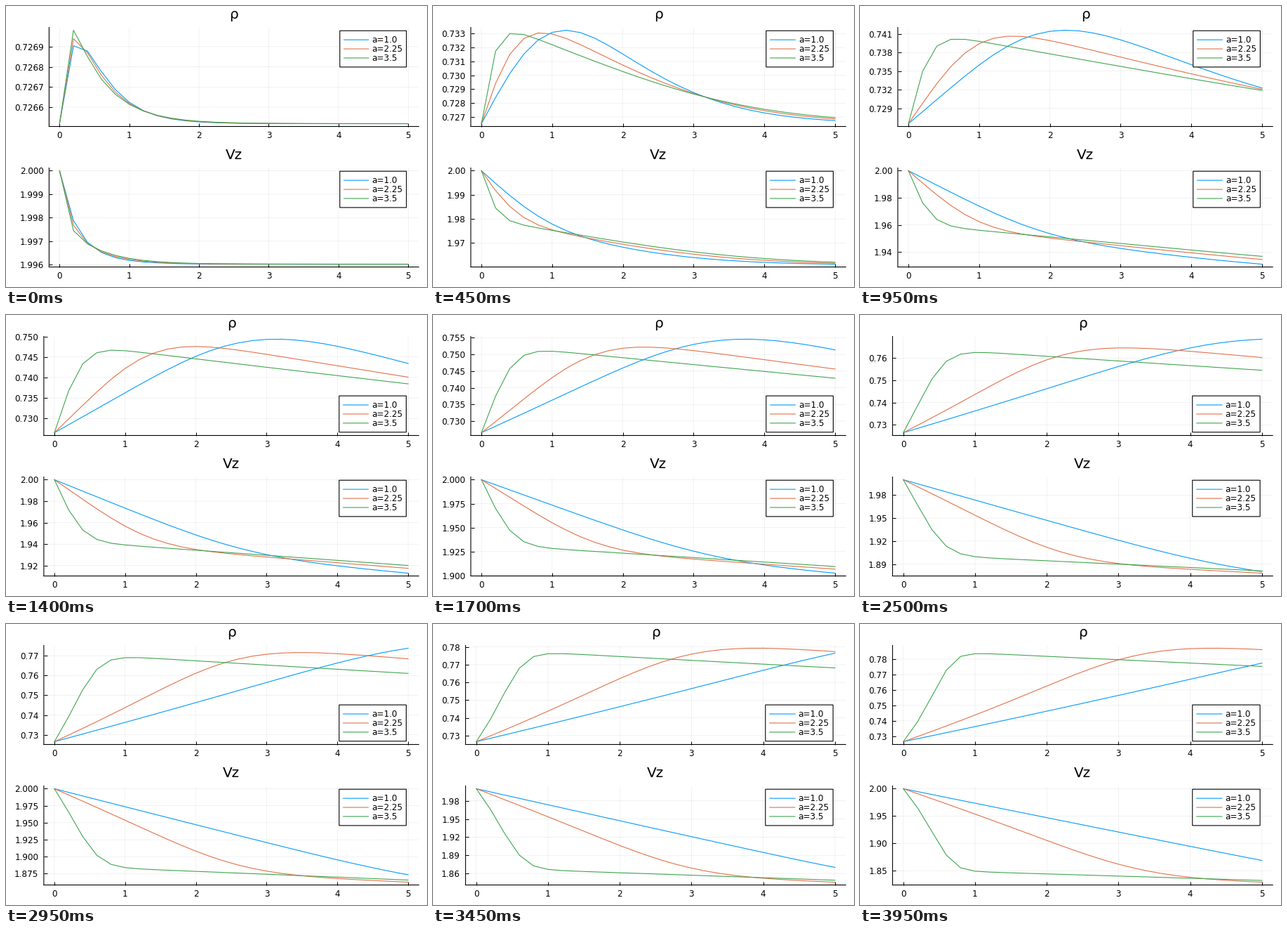
Write a matplotlib script that moves like this. It is 600x400 px and loops after 4000 ms.

```python
import math

import numpy as np
import matplotlib.pyplot as plt
from matplotlib.animation import FuncAnimation
from matplotlib.patches import Rectangle

W, H, DPI = 600, 400, 100
PX = 72 / DPI  # points per pixel
FRAMES, INTERVAL = 80, 50

RIGHT = 588.2
PANELS = [("ρ", 30.5, 171.5), ("Vz", 230.5, 371.5)]
EM, TITLE_EM = 12, 20
COLORS = ["#009AFA", "#E36F47", "#3EA44E"]
PARAMS = [1.0, 2.25, 3.5]

DZ, DT, FRICTION = 0.2, 0.1, 0.00998
RHO0, V0 = 0.726518, 2.0
z = np.linspace(0, 5, 26)

plt.rcParams["font.family"] = "DejaVu Sans"
plt.rcParams["path.snap"] = False


def step(rho, v, a):
    """One backward Euler step of isothermal pipe flow, upwind in z."""
    lam = DT / DZ
    new_rho, new_v = rho.copy(), v.copy()
    for i in range(1, len(z)):
        rl, vl = new_rho[i - 1], new_v[i - 1]
        inflow = rho[i] + lam * rl * vl
        u = v[i]
        for _ in range(8):
            r = inflow / (1 + lam * u)
            g = (u - v[i] + lam * (u * (u - vl) + a * (1 - rl / r))
                 + DT * FRICTION * u * u)
            dg = (1 + lam * (2 * u - vl - a * rl * lam / (r * (1 + lam * u)))
                  + 2 * DT * FRICTION * u)
            u = u - g / dg
        new_rho[i], new_v[i] = inflow / (1 + lam * u), u
    return new_rho, new_v


def simulate():
    """Array indexed [frame, quantity, z, parameter]."""
    a = np.array(PARAMS)
    rho = np.full((len(z), len(a)), RHO0)
    v = np.full((len(z), len(a)), V0)
    states = []
    for _ in range(FRAMES):
        rho, v = step(rho, v, a)
        states.append((rho, v))
    return np.array(states)


def nice_ticks(lo, hi):
    """Ticks scored by count, coverage and roundness of the step."""
    span = hi - lo
    top = math.ceil(math.log10(span))
    steps = [(1, 1.0), (5, 0.9), (2, 0.7), (2.5, 0.5), (3, 0.2)]
    best, result = -math.inf, []
    for power in range(top, top - 3, -1):
        for k in range(2, 17):
            for q, nice in steps:
                d = q * 10.0 ** power
                if not span <= (k - 1) * d < 2 * span:
                    continue
                ticks = np.arange(math.ceil(lo / d), math.floor(hi / d) + 1) * d
                n = len(ticks)
                if not 4 <= n <= 8:
                    continue
                score = ((1 - abs(n - 5) / 5) / 4
                         + 0.5 * span / ((n - 1) * d) + nice / 4)
                if score > best + 1e-9:
                    best, result = score, ticks
    return result


def tick_labels(ticks):
    digits = 0
    while np.any(np.abs(np.round(ticks, digits) - ticks) > 1e-9):
        digits += 1
    return [f"{t:.{digits}f}" for t in ticks]


def padded(lo, hi):
    pad = 0.03 * (hi - lo)
    return lo - pad, hi + pad


XLIM = padded(0, 5)


def legend_on_top(values, lo, hi):
    """Top right corner unless the bottom right one holds fewer points."""
    x = (z - XLIM[0]) / (XLIM[1] - XLIM[0])
    y = (values[x >= 0.75] - lo) / (hi - lo)
    return np.sum(y >= 0.75) <= np.sum(y <= 0.25)


class Panel:
    def __init__(self, fig, overlay, title, top, bottom):
        self.top, self.bottom = top, bottom
        self.ax = ax = fig.add_axes([0.1, 1 - bottom / H, 0.8, (bottom - top) / H],
                                    label=title)
        ax.set_facecolor("none")
        ax.set_xlim(XLIM)
        ax.set_xticks(range(6))
        ax.set_axisbelow(True)
        ax.grid(color="black", alpha=0.1, lw=0.5 * PX)
        ax.spines[["top", "right"]].set_visible(False)
        ax.spines[["left", "bottom"]].set_linewidth(1.1 * PX)
        ax.tick_params(direction="in", length=5 * PX, width=PX, labelsize=EM * PX)
        ax.tick_params(axis="x", pad=6.5 * PX)
        ax.tick_params(axis="y", pad=7.6 * PX)
        self.curves = [ax.plot(z, z, color=c, lw=1.1 * PX)[0] for c in COLORS]

        self.title = overlay.text(0, top - 12, title, ha="center",
                                  va="baseline", fontsize=TITLE_EM * PX)
        self.box = overlay.add_patch(Rectangle((0, 0), 1, 1, fc="white",
                                               ec="black", lw=1.1 * PX))
        self.keys = [overlay.plot([], [], color=c, lw=1.1 * PX)[0] for c in COLORS]
        self.names = [overlay.text(0, 0, f"a={a}", va="baseline",
                                   fontsize=EM * PX) for a in PARAMS]

    def set_data(self, values):
        lo, hi = padded(values.min(), values.max())
        for curve, y in zip(self.curves, values.T):
            curve.set_ydata(y)
        ticks = nice_ticks(lo, hi)
        labels = tick_labels(ticks)
        self.ax.set_yticks(ticks, labels)
        self.ax.set_ylim(lo, hi)
        self.on_top = legend_on_top(values, lo, hi)
        return max(map(len, labels))

    def place(self, left):
        width, height = RIGHT - left, self.bottom - self.top
        self.ax.set_position([left / W, 1 - self.bottom / H, width / W, height / H])
        self.title.set_x((left + RIGHT) / 2)

        unit, row = width / 45, 12.92
        right = RIGHT - 1.5 * unit
        anchor = right - unit / 2 - 42.2
        x0 = anchor - 4 * unit
        y0 = self.top + height / 30 if self.on_top else self.bottom - height / 30 - 4 * row
        self.box.set_bounds(x0, y0, right - x0, 4 * row)
        for i, (key, name) in enumerate(zip(self.keys, self.names), 1):
            y = y0 + i * row
            key.set_data([anchor - 3.5 * unit, anchor - unit / 2], [y, y])
            name.set_position((anchor - 1.3, y + 4.3))


fig = plt.figure(figsize=(W / DPI, H / DPI), dpi=DPI, facecolor="white")
overlay = fig.add_axes([0, 0, 1, 1], zorder=5)
overlay.set_xlim(0, W)
overlay.set_ylim(H, 0)
overlay.set_autoscale_on(False)
overlay.axis("off")

panels = [Panel(fig, overlay, *p) for p in PANELS]
states = simulate()


def update(frame):
    chars = max(p.set_data(values) for p, values in zip(panels, states[frame]))
    for p in panels:
        p.place(16.4 + 7.5 * chars)
    return []


anim = FuncAnimation(fig, update, frames=FRAMES, interval=INTERVAL,
                     init_func=lambda: update(0), repeat=True, blit=False)
plt.show()
```
